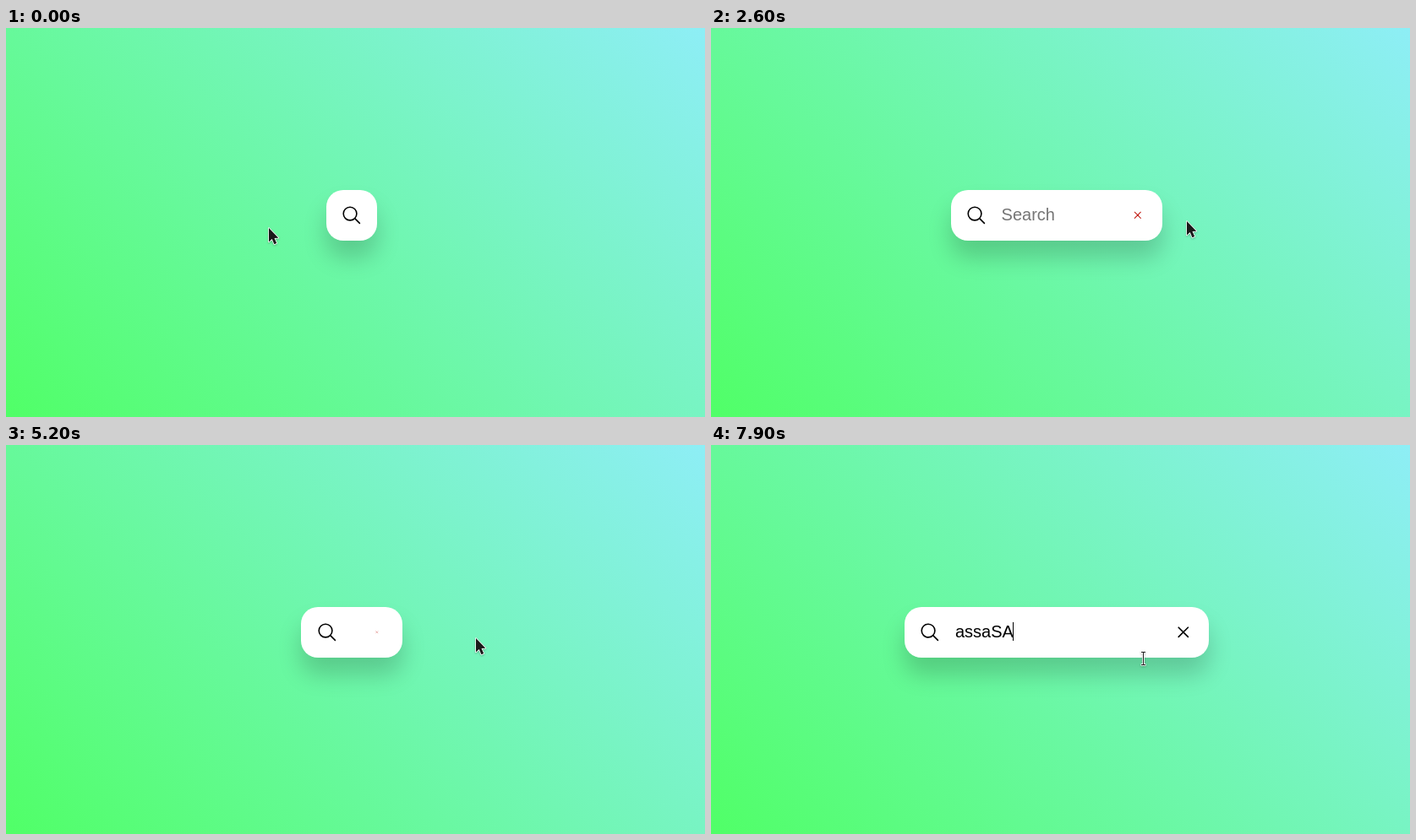
Write an HTML page that moves like this. It is 827x461 px and loops after 8 s.

```html
<!DOCTYPE html>
<html lang="en">
<head>
<meta charset="utf-8">
<title>Search bar</title>
<style>
  html, body { margin: 0; width: 100%; height: 100%; overflow: hidden; }
  body { position: relative; background: linear-gradient(45deg, #50ff67, #8eeef6); }
  .bar {
    position: absolute; top: 192px; height: 60px; overflow: hidden;
    border-radius: 20px; background: #fff;
    box-shadow: 0 20px 28px rgba(0, 0, 0, .18);
  }
  .icon {
    position: absolute; top: 17.2px; width: 25.6px; height: 25.6px;
    fill: none; stroke: currentColor; stroke-width: 32; stroke-linecap: round;
  }
  .search { left: 17.2px; }
  .close { right: 17.2px; }
  .input {
    position: absolute; left: 60px; right: 60px; top: 18px; height: 23px;
    overflow: hidden; white-space: pre;
    font: 20px/23px "Liberation Sans", Arial, sans-serif;
  }
  .caret {
    display: inline-block; width: 1px; height: 22px; margin-left: -1px;
    vertical-align: top; background: #000;
  }
  .cursor { position: absolute; left: 0; top: 0; width: 1px; height: 1px; overflow: visible; }
  .cursor path { fill: #1a1a1a; stroke: #fff; stroke-width: 1.6; paint-order: stroke; stroke-linejoin: round; }
  .cursor .beam { fill: none; stroke: #222; stroke-width: 1; }
  .cursor .halo { fill: none; stroke: #fff; stroke-width: 2.6; }
  .cursor svg, .cursor g { filter: drop-shadow(0 1px 1px rgba(0, 0, 0, .25)); }
</style>
</head>
<body>
<div class="bar" id="bar">
  <svg class="icon search" id="search" viewBox="0 0 512 512">
    <circle cx="221.1" cy="221.1" r="157.1"/>
    <path d="M338.3 338.3 448 448"/>
  </svg>
  <div class="input"><span id="text"></span><span class="caret" id="caret"></span></div>
  <svg class="icon close" id="close" viewBox="0 0 512 512">
    <path d="M368 368 144 144M368 144 144 368"/>
  </svg>
</div>
<svg class="cursor" id="cursor">
  <g data-kind="arrow"><path d="M0 0V16.5L3.7 13 6.4 19.3 9.2 18.1 6.5 12 11.3 11.7Z"/></g>
  <g data-kind="hand"><path d="M-1.8 1.8Q-1.6 0 0 0T1.7 1.8V6.2Q3.2 5.4 4.4 6.8 5.8 6 7 7.4 10.3 7 10.5 10.4V14.5L8.8 20H-2.2Q-5 16.5-7.4 12.2-7.9 9.6-5 10.2L-1.8 13Z"/></g>
  <g data-kind="beam">
    <path class="halo" d="M-2.5-7.5H2.5M.5-7.5V7.5M-2.5 7.5H3.5"/>
    <path class="beam" d="M-2-7.5H3M.5-7.5V7.5M-2 7.5H3"/>
  </g>
</svg>
<script>
const LOOP = 8000, TICK = 100, MOVE = 500, RED = '#c1180f';
const $ = id => document.getElementById(id);

// Opening and closing moments of the bar
const opened = [[650, 2485], [3520, 4950], [6220, Infinity]];
const searchHover = [[400, 700], [1500, 1700], [3300, 3600], [5700, 5800], [5900, 6300]];
const closeHover = [[2300, 3000], [4600, 5450]];
const typed = 'assaSA';
const keyTimes = [7200, 7300, 7400, 7500, 7700, 7800];

// Pointer path: time, x, y, shape from then on
const pointer = [
  [0, 311, 237, 'arrow'], [100, 312, 237, 'arrow'], [200, 312, 237, 'arrow'],
  [300, 360, 235, 'arrow'], [400, 417, 230, 'hand'], [700, 416, 230, 'hand'],
  [800, 412, 230, 'beam'], [1200, 372, 231, 'beam'], [1400, 305, 234, 'beam'],
  [1500, 264, 231, 'hand'], [1600, 264, 231, 'hand'], [1700, 360, 238, 'beam'],
  [1900, 587, 248, 'arrow'], [2000, 587, 248, 'arrow'], [2200, 566, 230, 'hand'],
  [2300, 560, 226, 'hand'], [2500, 561, 227, 'hand'], [2600, 563, 229, 'arrow'],
  [2900, 562, 229, 'arrow'], [3300, 422, 222, 'hand'], [3400, 410, 219, 'hand'],
  [3600, 410, 219, 'hand'], [3800, 420, 222, 'beam'], [4400, 535, 232, 'hand'],
  [4500, 549, 233, 'hand'], [4700, 557, 226, 'hand'], [5000, 557, 226, 'hand'],
  [5100, 556, 228, 'arrow'], [5300, 555, 229, 'arrow'], [5500, 441, 233, 'arrow'],
  [5600, 441, 233, 'arrow'], [5700, 420, 228, 'hand'], [5800, 367, 231, 'arrow'],
  [5900, 400, 230, 'hand'], [6000, 416, 230, 'hand'], [6300, 416, 230, 'hand'],
  [6400, 416, 230, 'beam'], [6900, 450, 215, 'beam'], [7100, 470, 215, 'beam'],
  [7400, 535, 250, 'arrow'], [7500, 540, 260, 'arrow'], [7700, 520, 258, 'arrow'],
  [7800, 511, 253, 'beam'], [8000, 511, 253, 'beam']
];

const within = (spans, t) => spans.some(([a, b]) => t >= a && t < b);

// CSS "ease": cubic-bezier(.25, .1, .25, 1), solved by bisection
function ease(x) {
  if (x <= 0) return 0;
  if (x >= 1) return 1;
  const curve = (s, a, b) => 3 * a * s * (1 - s) ** 2 + 3 * b * s * s * (1 - s) + s ** 3;
  let low = 0, high = 1;
  for (let i = 0; i < 24; i++) {
    const mid = (low + high) / 2;
    if (curve(mid, .25, .25) < x) low = mid; else high = mid;
  }
  return curve(low, .1, 1);
}

function openness(t, delay) {
  return opened.reduce((sum, [a, b]) =>
    sum + ease((t - a - delay) / MOVE) - ease((t - b) / MOVE), 0);
}

function pointerAt(t) {
  const i = pointer.findLastIndex(key => key[0] <= t);
  const [t0, x0, y0, kind] = pointer[i];
  const [t1, x1, y1] = pointer[i + 1];
  const p = (t - t0) / (t1 - t0);
  return { x: x0 + (x1 - x0) * p, y: y0 + (y1 - y0) * p, kind };
}

function render(t) {
  const width = 60 + 300 * openness(t, 0);
  $('bar').style.width = width + 'px';
  $('bar').style.left = 409 - width / 2 + 'px';
  $('close').style.transform = `scale(${openness(t, MOVE)})`;
  $('search').style.color = within(searchHover, t) ? RED : '#000';
  $('close').style.color = within(closeHover, t) ? RED : '#000';

  const count = keyTimes.filter(k => k <= t).length;
  $('text').textContent = count ? typed.slice(0, count) : 'Search';
  $('text').style.color = count ? '#000' : '#757575';
  $('caret').style.display = count ? '' : 'none';

  const { x, y, kind } = pointerAt(t);
  $('cursor').style.transform = `translate(${Math.round(x)}px, ${Math.round(y)}px)`;
  for (const shape of $('cursor').children)
    shape.style.display = shape.dataset.kind === kind ? '' : 'none';
}

const start = performance.now();
function frame() {
  const t = (performance.now() - start) % LOOP;
  render(Math.floor(t / TICK) * TICK);
  requestAnimationFrame(frame);
}
frame();
</script>
</body>
</html>
```
